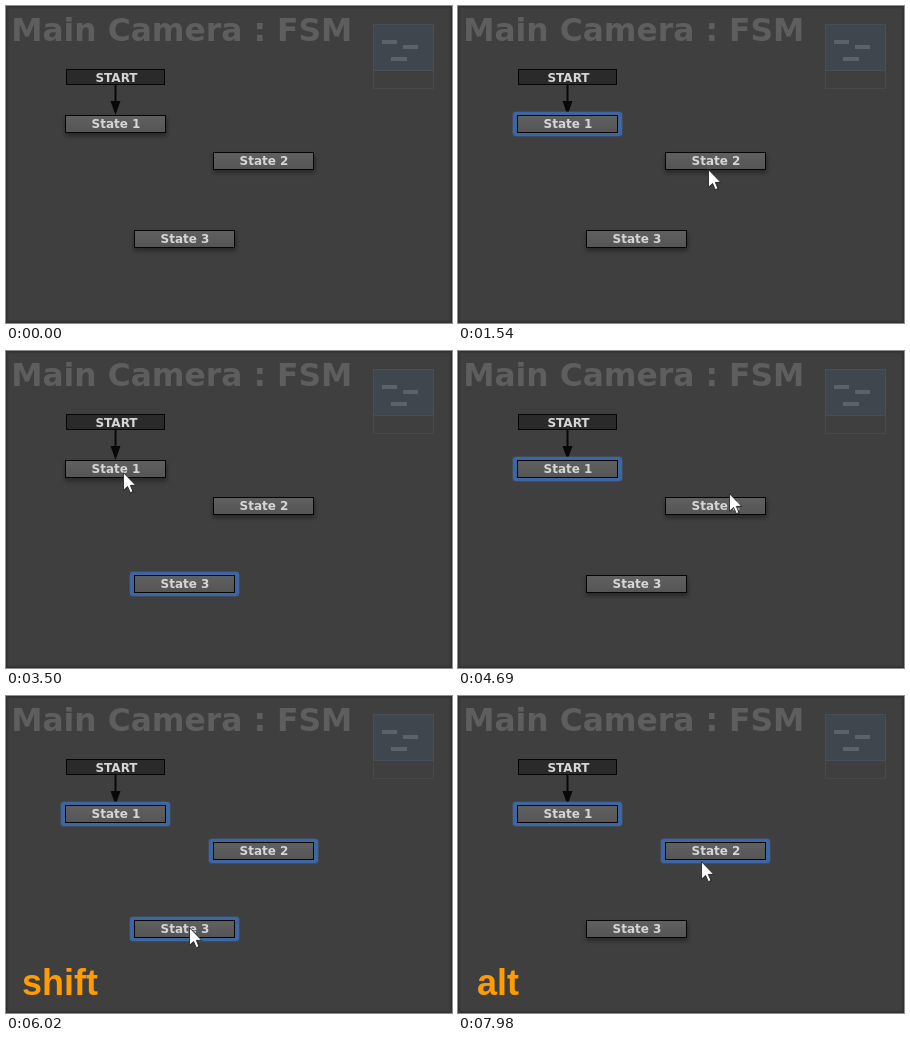
These frames come from a looping animation (446 by 317 pixels, 8 s). An HTML page:

```html
<!DOCTYPE html>
<html lang="en">
<head>
<meta charset="utf-8">
<title>Selecting states</title>
<style>
  html, body { margin: 0; width: 100%; height: 100%; overflow: hidden; background: #3f3f3f; }
  svg { display: block; width: 446px; height: 317px; }
  text { font-family: "DejaVu Sans", Verdana, sans-serif; font-weight: bold; }
  .label { font-size: 12px; fill: #d6d6d6; text-anchor: middle; }
  .key { font: bold 36px "Liberation Sans", Arial, sans-serif; fill: #ff9c00; }
</style>
</head>
<body>
<svg viewBox="0 0 446 317" xmlns="http://www.w3.org/2000/svg">
  <defs>
    <linearGradient id="face" x2="0" y2="1">
      <stop offset="0" stop-color="#606060"/>
      <stop offset="1" stop-color="#555"/>
    </linearGradient>
    <filter id="soft" x="-10%" y="-50%" width="120%" height="200%">
      <feGaussianBlur stdDeviation="2"/>
    </filter>
  </defs>
  <rect width="446" height="317" fill="#3f3f3f"/>
  <g fill="none" stroke="#000">
    <rect x=".5" y=".5" width="445" height="316" stroke-opacity=".24"/>
    <rect x="1.5" y="1.5" width="443" height="314" stroke-opacity=".13"/>
    <rect x="2.5" y="2.5" width="441" height="312" stroke-opacity=".06"/>
  </g>
  <text x="5.2" y="35" font-size="31.4" fill="#5e5e5e">Main Camera : FSM</text>

  <g id="map">
    <rect x="367.5" y="18.5" width="60" height="64" fill="#3f3f3f" stroke="#484848"/>
    <rect x="367.5" y="18.5" width="60" height="46" fill="#40464d" stroke="#474e55"/>
    <path d="M376 36h15M397 41h15M385 53h16" stroke="#5b6269" stroke-width="4"/>
  </g>

  <rect x="60.5" y="63.5" width="98" height="15" fill="#2a2a2a" stroke="#050505"/>
  <text class="label" x="110.5" y="76">START</text>
  <path d="M109.5 79V96" stroke="#080808" stroke-width="2"/>
  <g id="nodes"></g>

  <text class="key" id="shift" x="16" y="299">shift</text>
  <text class="key" id="alt" x="19" y="299">alt</text>

  <g id="cursor">
    <g transform="translate(0 -.8) scale(1.06)">
      <path d="M1.5 1.1V17.6L5.3 14L7.9 19.9L10.4 18.8L7.9 13H13Z" opacity=".25"/>
      <path d="M.5 .5V17L4.3 13.4L6.9 19.3L9.4 18.2L6.9 12.4H12Z" fill="#fff" stroke="#222" stroke-width=".8"/>
    </g>
  </g>
</svg>
<script>
const LOOP = 8000, STEP = 70;
const $ = id => document.getElementById(id);

// Each node: corner and the spans in which it is selected
const nodes = [
  { x: 59, y: 109, on: [[1260, 1960], [3920, LOOP]] },
  { x: 207, y: 146, on: [[1960, 2800], [5040, LOOP]] },
  { x: 128, y: 224, on: [[2800, 3920], [6020, 7560]] }
];

// Pointer: where it appears, then each glide with its target
const entry = { at: 280, x: 218, y: 253 };
const glides = [
  { from: 280, to: 840, x: 110, y: 119 },
  { from: 1330, to: 1540, x: 250, y: 164 },
  { from: 1540, to: 1820, x: 252, y: 157 },
  { from: 2240, to: 2450, x: 195, y: 222 },
  { from: 2450, to: 2660, x: 186, y: 230 },
  { from: 3010, to: 3360, x: 113, y: 126 },
  { from: 3360, to: 3500, x: 117, y: 122 },
  { from: 4410, to: 4690, x: 271, y: 143 },
  { from: 4690, to: 4970, x: 262, y: 155 },
  { from: 5180, to: 5670, x: 183, y: 232 },
  { from: 7700, to: 7980, x: 243, y: 166 }
];

const arrowHead = '<path d="M104.5 95h10l-5 14z" fill="#080808"/>';
$("nodes").innerHTML = nodes.map(({ x, y }, i) => `
  <rect class="shade" x="${x}" y="${y + 3}" width="102" height="18" opacity=".36" filter="url(#soft)"/>
  ${i ? "" : arrowHead}
  <g class="ring" fill="#3d66a3">
    <rect x="${x - 5}" y="${y - 4}" width="111" height="26" rx="4" opacity=".3"/>
    <rect x="${x - 4}" y="${y - 3}" width="109" height="24" rx="3"/>
  </g>
  <rect x="${x + .5}" y="${y + .5}" width="100" height="17" fill="url(#face)" stroke="#050505"/>
  <text class="label" x="${x + 51}" y="${y + 13}">State ${i + 1}</text>`).join("");
const rings = document.querySelectorAll(".ring");
const shades = document.querySelectorAll(".shade");

const within = (t, [from, to]) => t >= from && t < to;
const show = (el, on) => el.setAttribute("visibility", on ? "visible" : "hidden");
const ease = k => k * k * (3 - 2 * k);

function pointer(t) {
  let { x, y } = entry;
  for (const g of glides) {
    const k = ease(Math.min(1, Math.max(0, (t - g.from) / (g.to - g.from))));
    x += (g.x - x) * k;
    y += (g.y - y) * k;
  }
  return [Math.round(x), Math.round(y)];
}

function draw(time) {
  const t = Math.floor((time % LOOP) / STEP) * STEP;
  nodes.forEach((node, i) => {
    const on = node.on.some(span => within(t, span));
    show(rings[i], on);
    show(shades[i], !on);
  });
  show($("shift"), within(t, [4830, 6930]));
  show($("alt"), t >= 7490);
  show($("cursor"), t >= entry.at);
  $("cursor").setAttribute("transform", `translate(${pointer(t)})`);
}

const start = performance.now();
function tick() {
  draw(performance.now() - start);
  requestAnimationFrame(tick);
}
tick();
</script>
</body>
</html>
```
